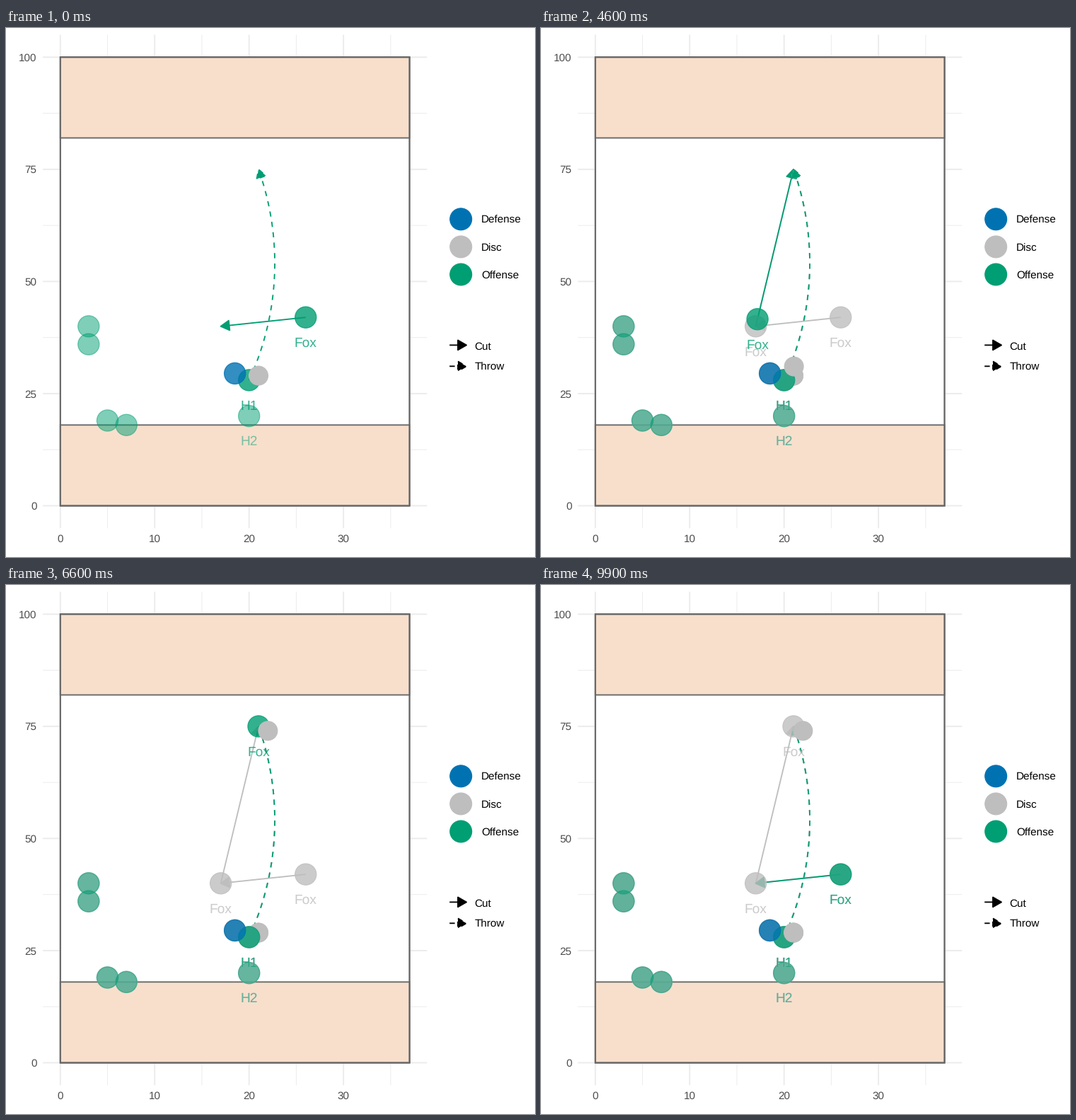
Write a matplotlib script that moves like this. It is 748 px wide and 748 px high and loops after 10000 ms.

```python
import numpy as np
import matplotlib
import matplotlib.pyplot as plt
from matplotlib.animation import FuncAnimation
from matplotlib.patches import Circle, Polygon, Rectangle

SIZE, DPI, FRAMES = 748, 100, 100
PT = 72 / DPI
GREEN, BLUE, GREY = "#009E73", "#0072B2", "#BEBEBE"
BORDER, GRID = "#666666", "#EBEBEB"
LINE = 1.85

matplotlib.rcParams.update({
    "font.family": "Liberation Sans",
    "path.snap": False,
    "text.hinting": "none",
})

fig = plt.figure(figsize=(SIZE / DPI, SIZE / DPI), dpi=DPI, facecolor="white")
ax = fig.add_axes([0, 0, 1, 1])
ax.set_xlim(0, SIZE)
ax.set_ylim(SIZE, 0)
ax.axis("off")


def px(x, y):
    """Field units to stage pixels."""
    return np.array([76.8 + 13.345 * x, 675.5 - 6.342 * y])


def line(points, color, width=LINE, alpha=1, dashed=False):
    xs, ys = np.transpose(points)
    return ax.plot(xs, ys, color=color, lw=width * PT, alpha=alpha, zorder=2,
                   ls=(0, (4, 4)) if dashed else "-",
                   solid_capstyle="butt", dash_capstyle="butt")[0]


def arrow(points, color, alpha=1, dashed=False):
    points = np.asarray(points, float)
    tip = points[-1]
    back = points[-2] - tip
    back /= np.hypot(*back)
    side = np.array([-back[1], back[0]])
    wings = [tip + 12 * back + 6.9 * side, tip, tip + 12 * back - 6.9 * side]
    head = Polygon(wings, closed=True, fc=color, ec=color, lw=LINE * PT,
                   alpha=alpha, joinstyle="round", zorder=2,
                   ls=(0, (4, 4)) if dashed else "-")
    return [line(points, color, alpha=alpha, dashed=dashed), ax.add_patch(head)]


def dot(center, radius, color, alpha=1):
    return ax.add_patch(Circle(center, radius, fc=color, ec=color,
                               lw=1.23 * PT, alpha=alpha, zorder=2))


def text(x, y, label, size, color, ha="center", alpha=1):
    return ax.text(x, y + 0.358 * size, label, fontsize=size * PT, color=color,
                   ha=ha, va="baseline", alpha=alpha, zorder=2)


def rect(y0, y1, fill):
    x, y = px(0, y1)
    w, h = px(37, y0) - (x, y)
    ax.add_patch(Rectangle((x, y), w, h, fc=fill, ec=BORDER, lw=LINE * PT, zorder=2))


def arc(start, end, sagitta, n=80):
    """Circular arc bulging to the right of the way from start to end."""
    chord = end - start
    length = np.hypot(*chord)
    along = chord / length
    normal = np.array([-along[1], along[0]])
    radius = (length ** 2 / 4 + sagitta ** 2) / (2 * sagitta)
    half = np.arcsin(length / 2 / radius)
    a = np.linspace(-half, half, n)[:, None]
    middle = (start + end) / 2 - (radius - sagitta) * normal
    return middle + radius * (np.sin(a) * along + np.cos(a) * normal)


def draw_stage():
    for step, width in ((5, LINE / 2), (10, LINE)):
        for x in range(0, 40, step):
            if step == 10 or x % 10:
                line([px(x, -5), px(x, 105)], GRID, width)
    for i in range(9):
        line([px(-1.85, 12.5 * i), px(38.85, 12.5 * i)], GRID,
             LINE / 2 if i % 2 else LINE)
    rect(0, 100, "white")
    for y in (0, 82):
        rect(y, y + 18, "#F7DFCC")
    rect(0, 100, "none")

    for x in range(0, 40, 10):
        text(px(x, 0)[0], 721.3, str(x), 15.2, "#4D4D4D")
    for y in range(0, 101, 25):
        text(43.5, px(0, y)[1], str(y), 15.2, "#4D4D4D", ha="right")

    for i, (label, color) in enumerate((("Defense", BLUE), ("Disc", GREY),
                                        ("Offense", GREEN))):
        y = 270.3 + 39.1 * i
        dot((643.2, y), 15.4, color)
        text(672, y + 0.5, label, 15.3, "black", ha="left")
    for y, label in ((448.4, "Cut"), (478.3, "Throw")):
        arrow([(627.2, y), (651, y)], "black", dashed=label == "Throw")
        text(662.5, y + 0.5, label, 15.3, "black", ha="left")


# Plays: the runner and the disc for each state, the last one closes the loop
RUNNER = np.array([(26, 42), (17, 40), (21, 75), (26, 42)], float)
DISC = np.array([(21, 29), (21, 29), (22, 74), (21, 29)], float)
CUTS = [(0, 1), (1, 2), None, (0, 1)]
MOVES = [(11, 22), (45, 22), (79, 21)]
IDLE = [(3, 40), (3, 36), (5, 19), (7, 18)]
THROW = arc(px(20, 28), px(21, 75), 29.3)


def cut(state, color, alpha=1):
    if CUTS[state] is None:
        return []
    a, b = CUTS[state]
    return arrow([px(*RUNNER[a]), px(*RUNNER[b])], color, alpha)


def points(runner, disc, tint=None):
    green, blue = tint or GREEN, tint or BLUE
    out = [dot(px(20, 28), 15.1, green, 0.8),
           dot(px(20, 20), 15.1, green, 0.5),
           dot(px(*runner), 15.1, green, 0.8)]
    out += [dot(px(*p), 15.1, green, 0.5) for p in IDLE]
    out.append(dot(px(18.5, 29.5), 15.1, blue, 0.8))
    out.append(dot(px(*disc), 13.4, GREY))
    return out


def labels(runner, color):
    spots = (((20, 28), "H1", 0.8), ((20, 20), "H2", 0.5), (runner, "Fox", 0.8))
    out = []
    for (x, y), name, alpha in spots:
        cx, cy = px(x, y - 5.5)
        out.append(text(cx, cy, name, 19.1, color, alpha=alpha))
    return out


live = []


def clear():
    while live:
        live.pop().remove()
    return []


def draw(frame):
    clear()
    step = frame + (frame >= 50)  # 101 steps shown in 100 frames
    state, t = 0, 0.0
    marks = 0
    for k, (start, span) in enumerate(MOVES):
        if step > start:
            marks = k + 1
            state, t = k, min((step - start) / span, 1)
    if t == 1:
        state, t = state + 1, 0.0
    after = min(state + 1, 3)
    runner = RUNNER[state] + t * (RUNNER[after] - RUNNER[state])
    disc = DISC[state] + t * (DISC[after] - DISC[state])

    for k in range(marks):
        live.extend(cut(k, GREY))
    live.extend(cut(state, GREEN))
    if t > 0:
        live.extend(cut(after, GREEN, t))
    for k in range(marks):
        live.extend(arrow(THROW, GREY, dashed=True))
    live.extend(arrow(THROW, GREEN, dashed=True))
    for k in range(marks):
        live.extend(points(RUNNER[k], DISC[k], GREY))
    live.extend(points(runner, disc))
    for k in range(marks):
        live.extend(labels(RUNNER[k], GREY))
    live.extend(labels(runner, GREEN))
    return live


draw_stage()
anim = FuncAnimation(fig, draw, frames=FRAMES, init_func=clear, interval=100,
                     repeat=True, repeat_delay=0, blit=False)
plt.show()
```
